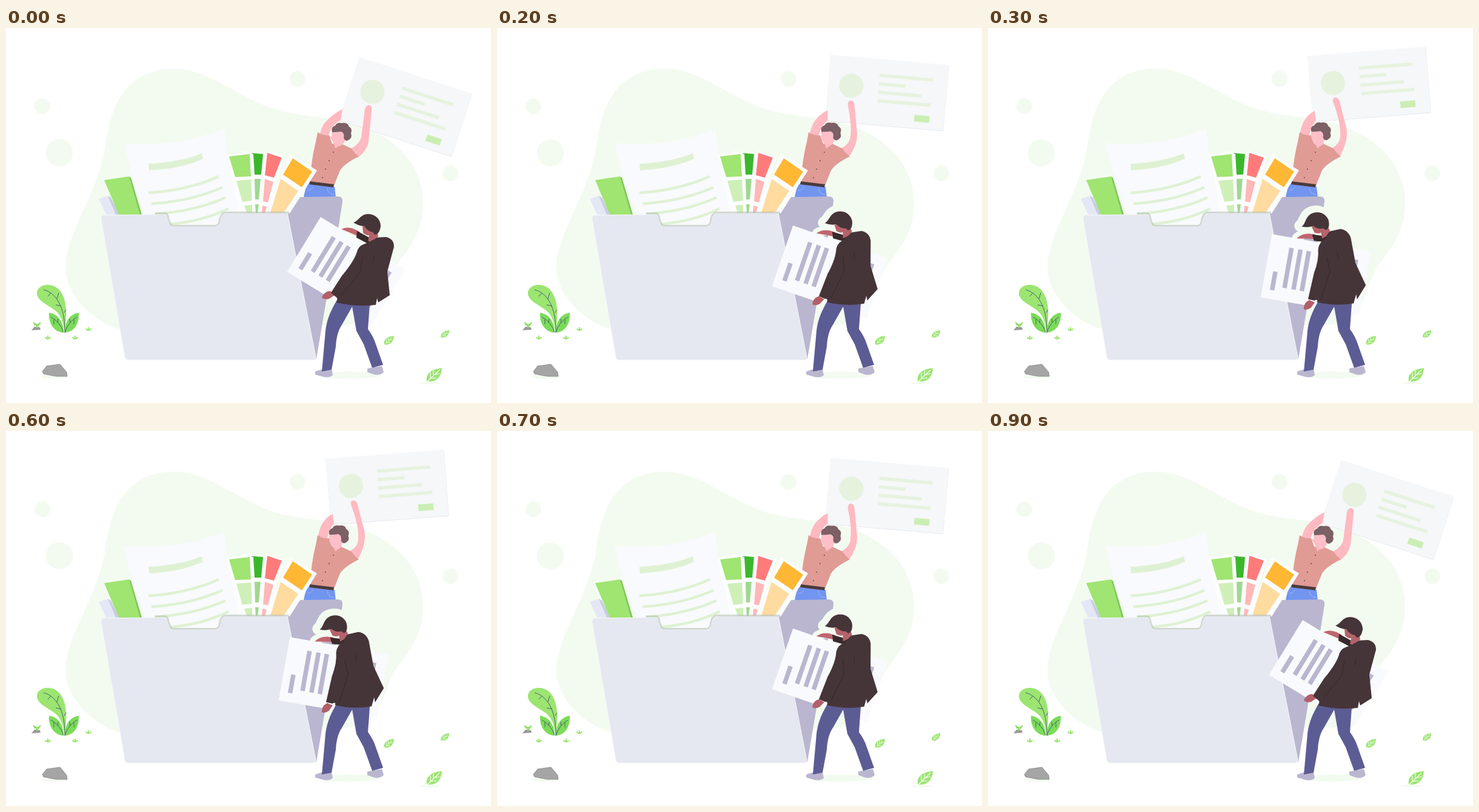
Animation, 800 px wide and 619 px high, one loop 1000 ms. Source, as an HTML page:

```html
<!DOCTYPE html>
<html lang="en">
<head>
<meta charset="utf-8">
<title>Filing documents</title>
<style>
html, body { margin: 0; width: 100%; height: 100%; overflow: hidden; background: #fff; }
svg { display: block; width: 100vw; height: 100vh; }
</style>
</head>
<body>
<svg viewBox="0 0 800 619">
  <defs>
    <g id="leaf">
      <path d="M-12 11C-14-3-3-10 13-11C12 3 5 12-9 11Z" fill="#9be570"/>
      <path d="M-12 12L9-8M-6 5V-4M-1 1V-7M-6 6L4 5M0 0L9-2" fill="none" stroke="#fff" stroke-width="1.200"/>
    </g>
    <path id="tuft" d="M0 3C-3 3-5 1-5-1Q-2-1-1 1Q-2-2 0-4Q2-2 1 1Q2-1 5-1C5 1 3 3 0 3Z" fill="#9be570"/>
  </defs>

  <g id="backdrop" fill="#f3fbf0">
    <path d="M278 67C335 67 385 117 450 136C505 150 562 145 615 175C660 200 688 240 688 290C688 335 665 365 645 390C620 425 625 488 560 490L188 497C150 488 98 445 98 395C98 340 150 275 163 200C170 150 184 67 278 67Z"/>
    <circle cx="60" cy="129" r="13"/>
    <circle cx="88" cy="206" r="22.5"/>
    <circle cx="481" cy="84" r="13"/>
    <circle cx="733" cy="240" r="13"/>
    <ellipse cx="80" cy="576" rx="23" ry="3"/>
    <ellipse cx="566" cy="573" rx="52" ry="6"/>
    <ellipse cx="700" cy="586" rx="18" ry="2"/>
  </g>

  <g id="plants">
    <path d="M96 502C103 470 100 435 79 426C62 420 50 429 51 439C53 452 72 458 82 467C92 476 95 488 96 502Z" fill="#9be570"/>
    <path d="M95 503C76 501 70 484 71 470C86 472 95 485 95 503ZM97 503C116 501 121 484 120 470C105 472 97 485 97 503Z" fill="#7bdc58"/>
    <path d="M62 432C82 437 98 460 97 503M74 437L69 443M84 447L87 437M91 459L82 457M96 470L99 465M74 477Q89 485 95 502M117 477Q103 485 97 502M79 481V489M85 487L86 480M112 481V489M106 487L105 480" fill="none" stroke="#4b6070" stroke-width="1"/>
    <path d="M60 567L67 558L89 555L100 568L101 575L83 575L62 571Z" fill="#a5a5a5" stroke="#858585" stroke-width=".8"/>
    <path d="M42 499L47 493L56 494L57 498Z" fill="#999"/>
    <path d="M51 495L50 490L45 486M51 494L57 486M46 490L56 489" fill="none" stroke="#8bdc60" stroke-width="2"/>
    <use href="#tuft" x="69" y="511"/>
    <use href="#tuft" x="114" y="511"/>
    <use href="#tuft" x="136" y="497"/>
    <use href="#leaf" transform="translate(706 572.500)"/>
    <use href="#leaf" transform="translate(631.500 515.500) scale(.65)"/>
    <use href="#leaf" transform="translate(724 505) scale(.55)"/>
  </g>

  <g id="climber">
    <path d="M498 257L542 262L544 280H491Q493 266 498 257Z" fill="#7295f0"/>
    <path d="M497 268Q504 268 506 262M541 275Q531 274 530 264" fill="none" stroke="#9db6fa"/>
    <g id="card">
      <g transform="rotate(18 583 48) translate(583 48)">
        <rect y="1" width="195.500" height="109" fill="#e6e8ec"/>
        <rect width="195" height="109" fill="#f5f7f9"/>
        <circle cx="38" cy="48" r="20" fill="#e6f2de"/>
        <path d="M83 27H171M83 41H127M83 55H155M83 69H171" stroke="#e6f2de" stroke-width="5.500"/>
        <rect x="146" y="87" width="25" height="11" fill="#cbeeb5"/>
      </g>
    </g>
    <path id="farArm" fill="#ffb9c1"/>
    <path id="nearArm" fill="#ffb9c1"/>
    <path d="M514 172Q522 178 533 177L538 191L553 191L570 199Q575 207 582 212Q558 224 551 235L541 260L501 254Q504 215 511 188Z" fill="#e09b95"/>
    <path d="M501 253L541 258L540 263L500 258Z" fill="#4a3b3b"/>
    <path d="M533 178L539 187L543 199L554 191L552 184Z" fill="#ffb9c1"/>
    <g fill="#6b4a4a">
      <circle cx="540" cy="205" r="1"/><circle cx="533" cy="219" r="1"/>
      <circle cx="527" cy="233" r="1"/><circle cx="522" cy="247" r="1"/>
    </g>
    <g id="climberHead">
      <path d="M538 168Q535 185 545 194Q555 198 560 184L562 170L545 165Z" fill="#ffbfc8"/>
      <path d="M538 172Q535 164 543 161Q546 155 554 157Q563 155 566 163Q572 166 569 174Q572 181 565 185Q559 188 557 181Q559 174 553 171Q545 172 538 172Z" fill="#7b6065"/>
    </g>
  </g>

  <g id="folder">
    <path d="M465 306L479 284Q482 279 488 279L547 278Q556 278 555 287L545 350L512 546H480Z" fill="#bab6cf"/>
    <path d="M153 282L168 277L187 308H165Z" fill="#e4e8f6"/>
    <path d="M168 277L173 280L187 308H181Z" fill="#c9cde0"/>
    <path d="M202 245L206 247L224 308H215Z" fill="#7fc65b"/>
    <path d="M162 251L203 245L221 308H186Z" fill="#a0e472"/>

    <g id="swatches">
      <path d="M364 209L404 205L409 306H384ZM387 205L428 207L419 306H408ZM429 203L460 212L431 306H420ZM468 208L513 235L468 306H428Z" fill="#fcfdfe"/>
      <path d="M368 212L402 208L404 245L378 246Z" fill="#a0e472"/>
      <path d="M380 252L405 250L406 285L390 287ZM393 293L406 292V305H397Z" fill="#cfefb8"/>
      <path d="M388 205L424 208L421 242H410L408 208Z" fill="#3cb72c"/>
      <path d="M410 249H420L417 283H411ZM411 291H417L415 305H412Z" fill="#9fd891"/>
      <path d="M431 206L455 214L442 247L427 243Z" fill="#ff7b7b"/>
      <path d="M427 249L441 254L432 288L424 286ZM423 293L430 295L427 305H422Z" fill="#ffb7b7"/>
      <path d="M473 215L505 237L488 263L457 242Z" fill="#ffb734"/>
      <path d="M453 249L482 269L458 305H436Z" fill="#ffdb9f"/>
      <path d="M404 205L408 306M388 205L404 206" stroke="#fcfdfe" stroke-width="3"/>
    </g>

    <path d="M194 190Q285 198 360 166Q366 240 385 308L350 327H272L230 307Q207 250 194 190Z" fill="#f9fafd"/>
    <path d="M235 224Q285 222 323 207L325 216Q287 233 236 235Z" fill="#dff1d3"/>
    <path d="M235 272Q300 268 351 245M240 290Q305 286 357 263M245 307Q310 303 362 280M269 324Q325 319 367 298" fill="none" stroke="#dff1d3" stroke-width="4.500"/>
    <path d="M162 309L245 308H262Q266 309 267 316L270 324Q271 328 276 328H346Q352 328 353 322Q355 307 362 306L464 305L511 543Q511 548 507 548H202Q197 548 196 543L157 316Q156 309 162 309Z" fill="#e5e8f0" stroke="#f5f6fa" stroke-width="1"/>
    <path d="M246 306H263Q267 307 268 315L271 323Q272 326 276 326.500H345Q351 326 352 320Q354 305 362 304.500H467" fill="none" stroke="#adb9ac" stroke-opacity=".5" stroke-width="3"/>
  </g>

  <g id="paper">
    <path d="M555 333Q575 326 600 346L632 346" fill="none" stroke="#f3fbf0" stroke-width="16" stroke-linecap="round"/>
    <use href="#cap" id="halo" stroke="#f3fbf0" stroke-width="20" stroke-linejoin="round"/>
    <g transform="rotate(31.500 519 312) translate(519 312)">
      <rect width="165" height="106" fill="#f9fafd"/>
      <path d="M36 17V84M51 17V84M65 17V84M144 17V84M16.500 60V91" stroke="#bab6cf" stroke-width="7.500"/>
    </g>
  </g>

  <g id="carrier">
    <path d="M510 567L522 563H537L539 573Q532 579 521 575L510 572ZM596 562L620 558L623 568Q617 574 607 572L596 568Z" fill="#bab6cf"/>
    <path d="M553 440L600 445V456L597 497Q606 509 610 522L622 556L604 561L590 522L578 500L571 460L554 490Q545 503 544 526L537 564L521 567L527 500C530 475 540 460 547 447Z" fill="#5c5c94"/>
    <g id="torso">
      <path d="M553 332Q563 327 575 332L584 337L579 343Q568 338 553 332Z" fill="#c0656f"/>
      <path d="M521 445Q524 435 535 434L542 441L533 447Q526 449 521 445Z" fill="#b25f69"/>
      <path d="M579 335L601 347L599 357L578 346Z" fill="#382a2b"/>
      <path id="jacket" fill="#453538"/>
      <path d="M588 378L584 403L553 441M607 376L605 388" fill="none" stroke="#35282b" stroke-width="1"/>
      <g id="carrierHead">
        <path d="M588 327L589 338Q594 343 599 342L597 352Q607 351 614 344L611 328Z" fill="#b5636b"/>
        <path id="cap" d="M573 321C582 319 584 307 598 307C612 308 618 318 618 327C617 335 614 341 608 341L605 337Q597 336 591 327Q582 327 573 321Z" fill="#453538"/>
      </g>
    </g>
  </g>
</svg>
<script>
const el = id => document.getElementById(id);
const LEAN = [0, .19, .43, .74, 1];   // progress of the swing, one value per 100 ms step

// Each pair holds the upright and the fully leaning outline.
const SHAPES = {
  farArm: [
    "M517 179Q520 162 528 154Q540 141 555 134L552 152Q541 158 536 167L531 179Z",
    "M513 179Q515 160 521 150Q527 140 533 138L537 153Q533 160 531 168L529 179Z"
  ],
  nearArm: [
    "M569 199Q584 191 586 180Q589 157 592 134Q594 127 599 127Q604 128 603 136L598 188Q594 205 580 214Z",
    "M567 198Q578 192 579 180Q581 160 561 117Q558 111 564 110Q569 110 572 117L589 158Q595 180 580 212Z"
  ],
  jacket: [
    "M545 453Q549 446 543 443L536 437L554 409Q576 383 580 366Q584 357 599 354L606 346L627 345Q640 348 640 361L629 402L633 441L614 453L612 446L610 457Q577 461 545 453Z",
    "M546 438Q550 434 542 436L533 430L560 391Q574 376 579 360Q585 349 596 348L603 338L625 343Q636 350 635 365L628 406L630 447L607 465L610 456L598 469Q570 460 546 438Z"
  ]
};

function mixPath([from, to], k) {
  const target = to.match(/\d+/g);
  let i = 0;
  return from.replace(/\d+/g, n => +n + (target[i++] - n) * k);
}

function progress(time) {
  const step = Math.floor(time % 1000 / 100);
  return LEAN[step < 5 ? step : Math.min(4, 9 - step)];
}

function draw(now) {
  const k = progress(now);
  const move = (id, transform) => el(id).setAttribute("transform", transform);
  const nod = `translate(${-7 * k} ${-6 * k})`;
  move("card", `rotate(${-30.4 * k} 550 187)`);
  move("climberHead", `translate(${-6 * k} ${-k})`);
  move("paper", `rotate(${-29 * k} 568 460)`);
  move("torso", `rotate(${-29 * k} 572 455)`);
  move("carrierHead", nod);
  move("halo", nod);
  for (const id in SHAPES) el(id).setAttribute("d", mixPath(SHAPES[id], k));
  requestAnimationFrame(draw);
}
draw(performance.now());
</script>
</body>
</html>
```
